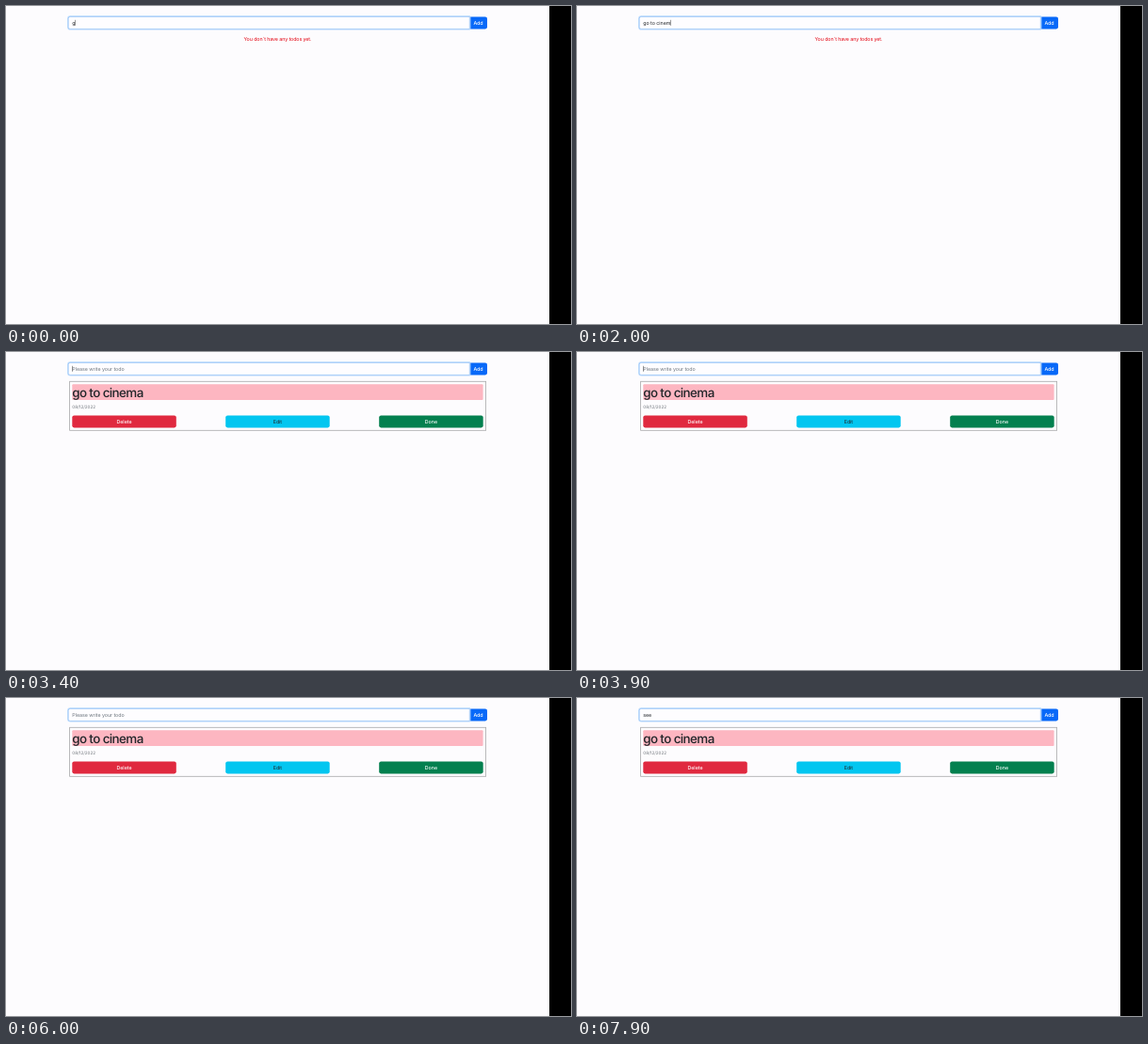
An HTML page for the animation above (8000 ms loop, 600 px wide and 338 px high).

```html
<!DOCTYPE html>
<html lang="en">
<head>
<meta charset="utf-8">
<title>Todo list</title>
<style>
  html, body { margin: 0; width: 100%; height: 100%; overflow: hidden; background: #fdfcfe; }
  svg { display: block; width: 600px; height: 338px; }
  text {
    font: 400 5.32px Inter, "Open Sans", sans-serif;
    letter-spacing: -.008em;
    text-rendering: geometricPrecision;
    white-space: pre;
    fill: #212529;
  }
  .mid { text-anchor: middle; }
  .light { fill: #fff; font-weight: 500; }
  .hint { fill: #6c757d; }
  .warn { fill: #e3000f; letter-spacing: -.016em; }
  .title { font-size: 13.4px; font-weight: 500; letter-spacing: -.044em; }
  .date { font-size: 4.6px; fill: #70767c; }
</style>
</head>
<body>
<svg viewBox="0 0 600 338">
  <rect width="600" height="338" fill="#fdfcfe"/>
  <rect x="577" width="23" height="338" fill="#000"/>

  <!-- input row -->
  <path d="M492 11.4h16.9a2.1 2.1 0 0 1 2.1 2.1v8.8a2.1 2.1 0 0 1-2.1 2.1H492z" fill="#0869f8"/>
  <text class="mid light" x="501.5" y="19.7">Add</text>
  <path d="M68.2 11.4H492.3V24.4H68.2a2 2 0 0 1-2-2v-9a2 2 0 0 1 2-2z"
        fill="none" stroke="#bddcfd" stroke-width="2.2" stroke-linejoin="round"/>
  <path d="M68.2 11.4H492.3V24.4H68.2a2 2 0 0 1-2-2v-9a2 2 0 0 1 2-2z"
        fill="#fefdff" stroke="#86b9f5" stroke-width=".6"/>
  <text id="hint" class="hint" x="70.3" y="19.6">Please write your todo</text>
  <text id="typed" x="70.3" y="19.6"></text>
  <rect id="caret" y="14.8" width=".45" height="6" fill="#222"/>

  <text id="empty" class="mid warn" x="288.5" y="37.3">You don´t have any todos yet.</text>

  <g id="card">
    <rect x="67.6" y="31.3" width="442" height="52" fill="none" stroke="#a9a9ab" stroke-width=".8"/>
    <rect x="70.3" y="34.3" width="436.3" height="16.6" rx="1" fill="#fdb6c1"/>
    <text class="title" x="70.2" y="47.5">go to cinema</text>
    <text class="date" x="70.3" y="59.6">08/12/2022</text>
    <g id="buttons"></g>
  </g>
</svg>
<script>
  const LOOP = 8000;
  const $ = id => document.getElementById(id);

  // [start ms, typed text, caret visible]
  const steps = [
    [0, "g", 1], [200, "go", 1], [400, "go ", 1], [700, "go to", 1],
    [900, "go to ", 1], [1200, "go to c", 1], [1400, "go to ci", 1],
    [1600, "go to cin", 1], [1800, "go to cine", 1], [2000, "go to cinem", 1],
    [2100, "go to cinema", 1], [2700, "go to cinema", 0], [3100, "go to cinema", 1],
    [3400, "", 1], [4000, "", 0], [4500, "", 1], [5000, "", 0], [5500, "", 1], [6000, "", 0],
    [6400, "s", 1], [6600, "se", 1], [6800, "see", 1], [7000, "see ", 1], [7500, "see ", 0]
  ];
  const ADDED = 3400;

  const buttons = [
    [70.3, "Delete", "#e0293f", "light"],
    [233.2, "Edit", "#03c6f0", ""],
    [396.2, "Done", "#04804f", "light"]
  ];
  $("buttons").innerHTML = buttons.map(([x, label, fill, tone]) =>
    `<rect x="${x}" y="67.4" width="110.5" height="13" rx="2.1" fill="${fill}"/>
     <text class="mid ${tone}" x="${x + 55.2}" y="75.8">${label}</text>`).join("");

  const show = (id, on) => $(id).setAttribute("visibility", on ? "visible" : "hidden");

  function draw(time) {
    const t = time % LOOP;
    const [, text, caret] = steps.findLast(step => step[0] <= t);
    const typed = $("typed");
    if (typed.textContent !== text) typed.textContent = text;
    const width = text ? typed.getComputedTextLength() : 0;
    $("caret").setAttribute("x", 70.3 + width);
    show("caret", caret);
    show("hint", !text);
    show("empty", t < ADDED);
    show("card", t >= ADDED);
  }

  const start = performance.now();
  function tick() {
    draw(performance.now() - start);
    requestAnimationFrame(tick);
  }
  tick();
</script>
</body>
</html>
```
